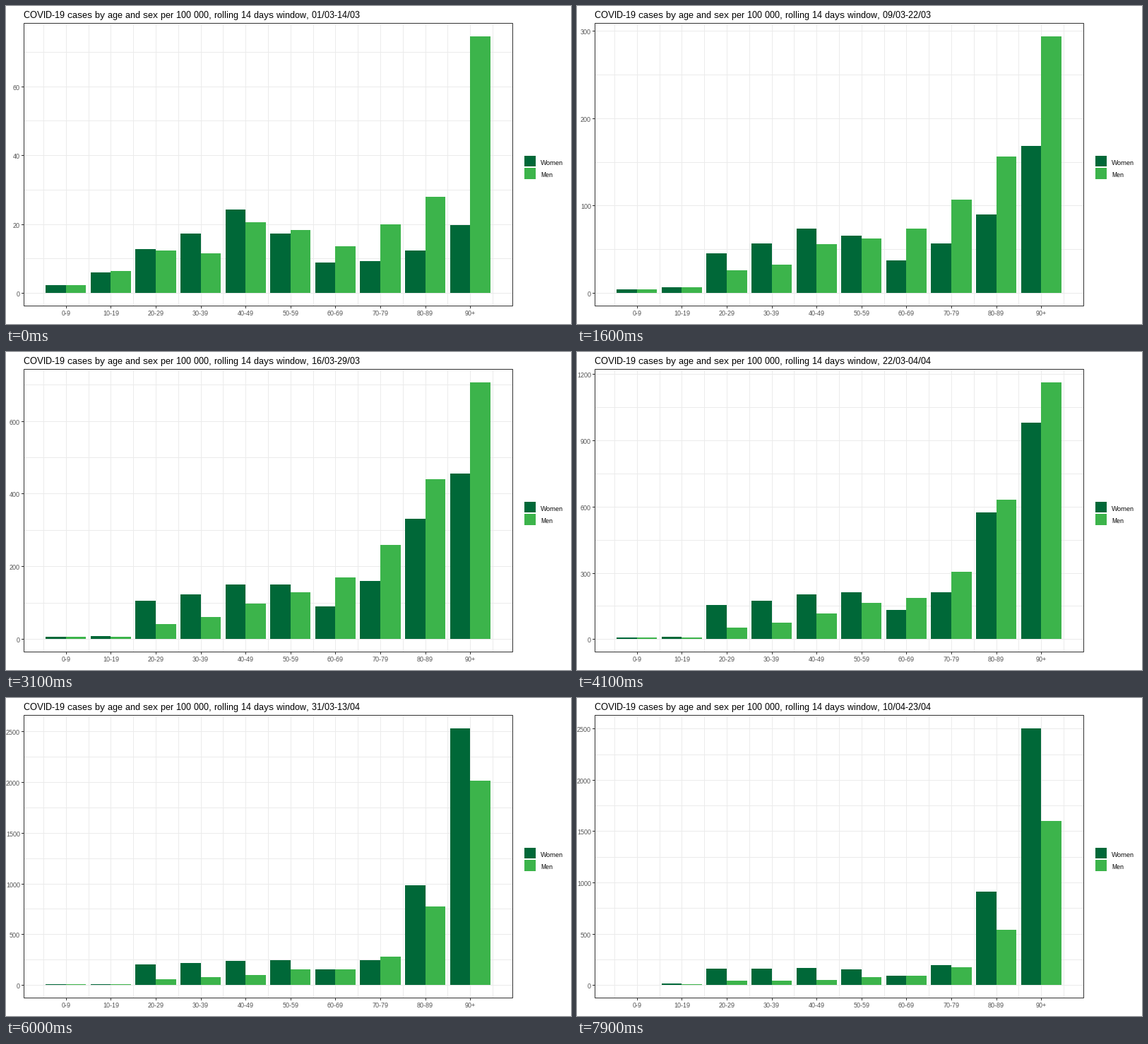
Animation, 800 px wide and 450 px high, one loop 8 s. Source, as a matplotlib script:

```python
import matplotlib.pyplot as plt
import numpy as np
from matplotlib.animation import FuncAnimation
from matplotlib.collections import LineCollection
from matplotlib.patches import Rectangle

W, H = 800, 450
FRAMES, INTERVAL = 80, 100
LEFT, RIGHT, TOP, BOTTOM = 24.7, 717.3, 24.4, 424.4
BASE = BOTTOM - (BOTTOM - TOP) * 0.05 / 1.1   # y of zero
FULL = (BOTTOM - TOP) / 1.1                   # height of the tallest bar
STEP = (RIGHT - LEFT) / 1.1 / 9.9             # distance between age groups
BAR = 0.45 * STEP
DAYS_PER_FRAME = 51 / 99

GREENS = ("#006838", "#3cb44b")
GRID, BORDER, AXIS_TEXT = "#ebebeb", "#333333", "#4d4d4d"

# Women and men per 100 000: a few key points spread evenly over the loop
CASES = {
    "0-9": [(2.3, 6, 4.5), (2.3, 6, 4.5)],
    "10-19": [(6, 9, 16), (6.4, 7, 9)],
    "20-29": [(12.8, 146, 161), (12.4, 50, 43)],
    "30-39": [(17.3, 166, 161), (11.5, 73, 43)],
    "40-49": [(24.3, 195, 168), (20.6, 114, 50)],
    "50-59": [(17.3, 203, 154), (18.3, 160, 78)],
    "60-69": [(8.9, 125, 92), (13.6, 143, 168, 92)],
    "70-79": [(9.3, 125, 238, 195), (20, 213, 300, 174)],
    "80-89": [(12.4, 235, 855, 912), (28, 340, 762, 540)],
    "90+": [(19.8, 130, 318, 880, 2060, 2700, 2505),
            (74.6, 240, 545, 1085, 1850, 1990, 1601)],
}


def growth(keys):
    """Smooth curve through the key points on a log scale, one value per frame."""
    y = np.log(keys)
    m = np.gradient(y, edge_order=2)
    x = np.linspace(0, len(y) - 1, FRAMES)
    k = np.minimum(x.astype(int), len(y) - 2)
    u = x - k
    v = 1 - u
    return np.exp((1 + 2 * u) * v * v * y[k] + u * v * v * m[k]
                  + (1 + 2 * v) * u * u * y[k + 1] - u * u * v * m[k + 1])


def tick_step(lo, hi):
    """Step of the best-scoring tick labels (extended Wilkinson, from zero)."""
    best, chosen = -np.inf, 1
    for rank, q in enumerate((1, 5, 2, 2.5, 4, 3)):
        for power in range(4):
            step = q * 10 ** power
            for count in range(1, 12):
                top = count * step
                cover = 1 - 0.5 * ((hi - top) ** 2 + lo ** 2) / (0.1 * (hi - lo)) ** 2
                ratio = (max(top, hi) - lo) / (4 * step)
                density = 2 - max(ratio, 1 / ratio)
                score = 0.25 * (1 - rank / 5) + 0.2 * cover + 0.5 * density
                if score > best:
                    best, chosen = score, step
    return chosen


def date(day):
    month, d = (3, day) if day < 31 else (4, day - 31)
    return f"{d + 1:02d}/{month:02d}"


plt.rcParams.update({
    "font.family": "Liberation Sans",
    "text.hinting": "native",
    "text.hinting_factor": 1,
})
fig = plt.figure(figsize=(W / 100, H / 100), dpi=100, facecolor="white")
ax = fig.add_axes([0, 0, 1, 1])
ax.set(xlim=(0, W), ylim=(H, 0))
ax.axis("off")


def label(x, y, s, px=9, color="black", ha="left"):
    return ax.text(x, y, s, fontsize=px * 0.72, color=color, ha=ha, va="baseline")


def lines(segments, color, z):
    return ax.add_collection(LineCollection(
        segments, colors=color, linewidths=0.72, snap=False, zorder=z),
        autolim=False)


def rect(x, y, w, h, color):
    return ax.add_patch(Rectangle((x, y), w, h, facecolor=color, edgecolor="none",
                                  linewidth=0, antialiased=False, zorder=2))


def pixel(v):
    """Centre of the pixel nearest to v."""
    return np.round(v) + 0.5


left, right, top, bottom = (pixel(v) for v in (LEFT, RIGHT, TOP, BOTTOM))
centres = LEFT + (RIGHT - LEFT) * 0.05 / 1.1 + BAR + STEP * np.arange(10)
halves = centres[0] + STEP * (np.arange(11) - 0.5)
lines([[(x, top), (x, bottom)] for x in pixel(np.append(centres, halves))], GRID, 1)
lines([[(x, bottom + 0.5), (x, bottom + 3.5)] for x in pixel(centres)], BORDER, 4)
ax.add_patch(Rectangle((left, top), right - left, bottom - top, fill=False,
                       edgecolor=BORDER, linewidth=0.72, snap=False, zorder=4))
for x, age in zip(centres, CASES):
    label(x, 438, age, color=AXIS_TEXT, ha="center")

for y, h, base, name, color in ((212, 15, 225, "Women", GREENS[0]),
                                (229, 16, 242, "Men", GREENS[1])):
    rect(734, y, 16, h, color)
    label(757, base, name)

title = label(25, 17, "", px=13)
grid = lines([], GRID, 1)
ticks = lines([], BORDER, 4)
numbers = [label(20, 0, "", color=AXIS_TEXT, ha="right") for _ in range(10)]
bars = [(rect(x + BAR * (side - 1), BASE, BAR, 0, GREENS[side]), growth(keys))
        for x, pair in zip(centres, CASES.values())
        for side, keys in enumerate(pair)]


def draw(i):
    peak = max(values[i] for _, values in bars)
    scale = FULL / peak
    for bar, values in bars:
        bar.set_y(BASE - values[i] * scale)
        bar.set_height(values[i] * scale)

    hi = 1.05 * peak
    step = tick_step(-0.05 * peak, hi)
    rows = pixel(BASE - np.arange(0, hi, step / 2) * scale)
    marks = rows[::2]
    grid.set_segments([[(left, y), (right, y)] for y in rows])
    ticks.set_segments([[(left - 3.5, y), (left - 0.5, y)] for y in marks])
    for n, text in enumerate(numbers):
        shown = n < len(marks)
        text.set_text(f"{n * step:g}" if shown else "")
        text.set_y(marks[n] + 4.5 if shown else 0)

    day = int(i * DAYS_PER_FRAME)
    title.set_text("COVID-19 cases by age and sex per 100 000, rolling 14 days "
                   f"window, {date(day)}-{date(day + 13)}")


anim = FuncAnimation(fig, draw, frames=FRAMES, interval=INTERVAL,
                     repeat=True, repeat_delay=0, blit=False)
plt.show()
```
